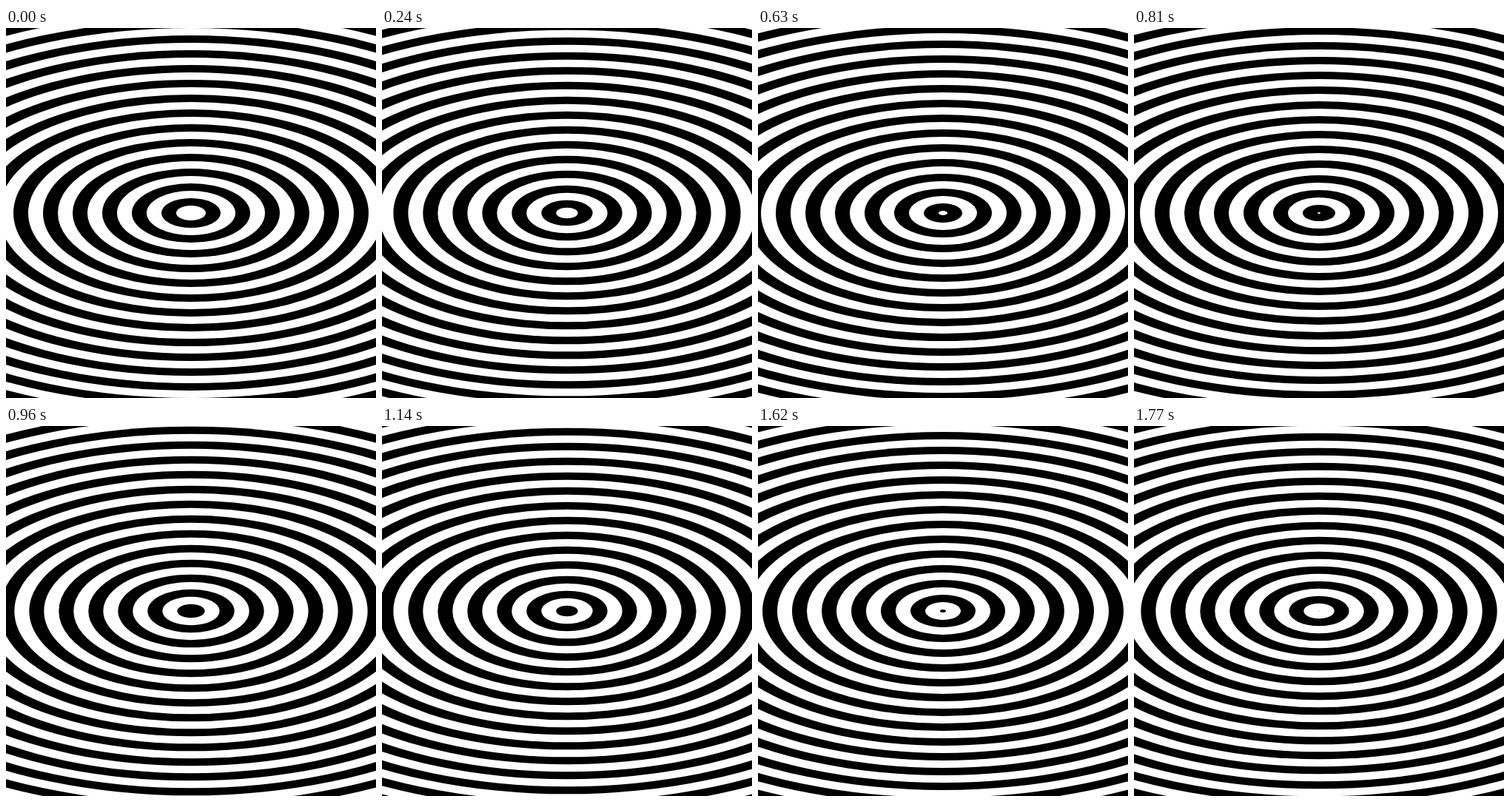
Write an HTML page that moves like this. It is 500 px wide and 500 px high and loops after 1800 ms.

```html
<!DOCTYPE html>
<html lang="en">
<head>
<meta charset="utf-8">
<title>Shrinking rings</title>
<style>
  html, body { margin: 0; width: 100%; height: 100%; overflow: hidden; background: #fff; }
  svg { display: block; width: 100%; height: 100%; }
</style>
</head>
<body>
<svg id="stage" viewBox="0 0 500 500"></svg>
<script>
  const LOOP = 1800, STEP = 30;
  const BAND = 20, COUNT = 32;
  const stage = document.getElementById('stage');

  // Stacked discs, largest first, alternating black and white.
  const discs = [];
  for (let k = COUNT; k > 0; k--) {
    const el = document.createElementNS('http://www.w3.org/2000/svg', 'ellipse');
    el.setAttribute('cx', 250);
    el.setAttribute('cy', 250);
    el.setAttribute('fill', k % 2 ? '#fff' : '#000');
    stage.append(el);
    discs.push({ el, radius: k * BAND });
  }

  function draw(time) {
    const t = Math.floor((time % LOOP) / STEP) * STEP;
    const shift = 2 * BAND * t / LOOP;
    for (const { el, radius } of discs) {
      const r = Math.max(0, radius - shift);
      el.setAttribute('rx', r);
      el.setAttribute('ry', r / 2);
    }
  }

  function tick() {
    draw(performance.now());
    requestAnimationFrame(tick);
  }

  draw(0);
  requestAnimationFrame(tick);
</script>
</body>
</html>
```
